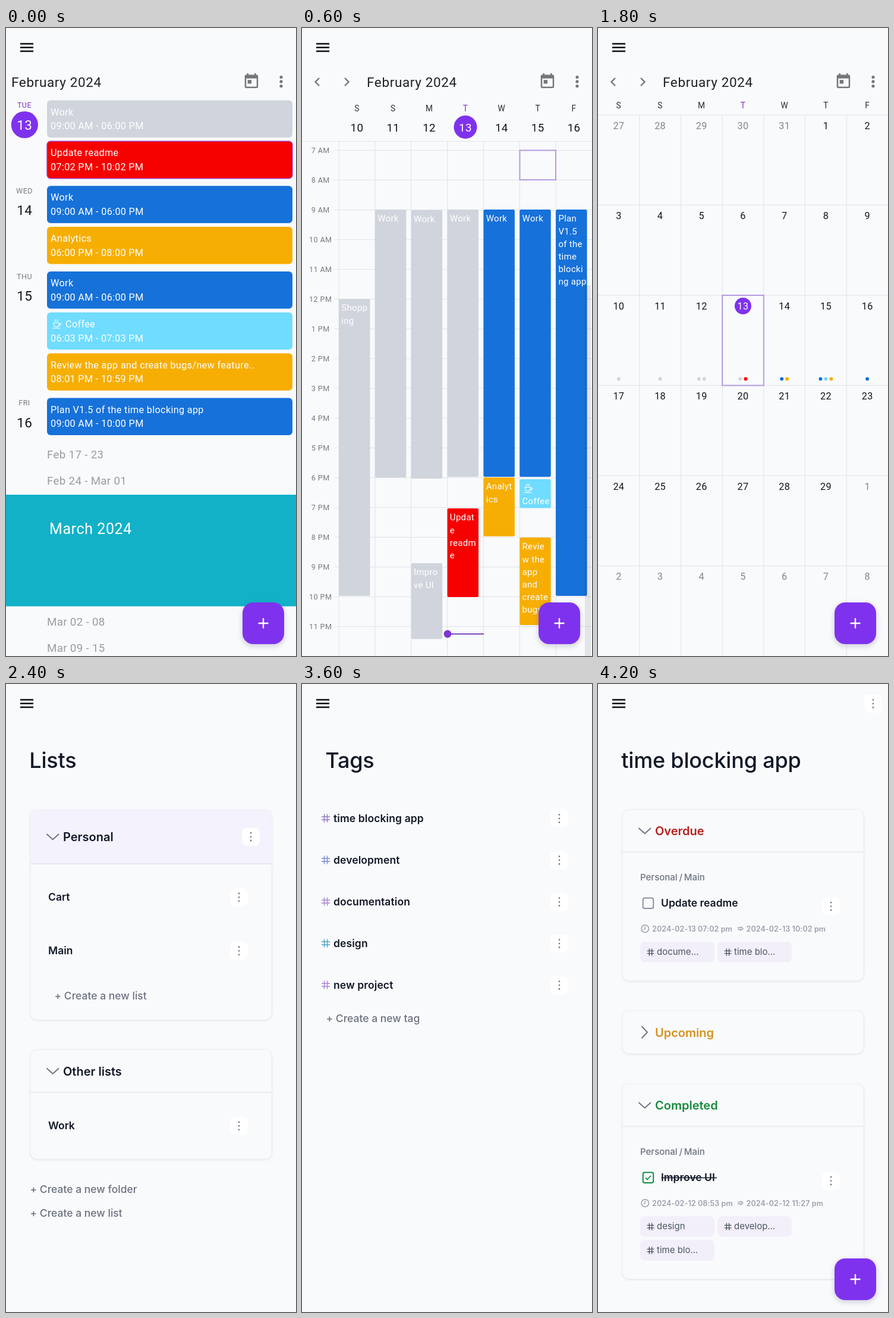
An HTML page for the animation above (4.8 s loop, 488x1055 px).

```html
<!DOCTYPE html>
<html lang="en">
<head>
<meta charset="utf-8">
<title>Time blocking</title>
<style>
html, body { margin: 0; width: 100%; height: 100%; overflow: hidden; background: #f9fafc; }
svg { position: absolute; left: 0; top: 0; width: 488px; height: 1055px; display: block; }
text { white-space: pre; }
.scene { visibility: hidden; animation: show 4.8s step-end infinite; animation-delay: calc(var(--i) * .6s - 4.8s); }
.cal { font-family: Roboto, sans-serif; letter-spacing: .31px; }
.app { font-family: Inter, sans-serif; font-optical-sizing: none; }
.fab { filter: drop-shadow(0 3px 5px rgba(80, 80, 115, .28)); }
.card { filter: drop-shadow(0 1.5px 1.5px rgba(60, 65, 90, .13)); }
@keyframes show { 0% { visibility: visible; } 12.5%, 100% { visibility: hidden; } }
</style>
</head>
<body>
<svg id="stage" viewBox="0 0 488 1055"></svg>
<script>
const BG = '#f9fafc', PURPLE = '#7f32ee', INK = '#111827', MUTED = '#6b7280', GRID = '#e2e3e7';
const GRAY = '#d0d4dc', BLUE = '#1671d9', AMBER = '#f7ae02', SKY = '#70dcff', RED = '#f60000';

// Shapes; text is placed by the middle of its capitals.
const text = (x, cy, s, size, fill, more = '') =>
  `<text x="${x}" y="${cy + size * .36}" font-size="${size}" fill="${fill}" ${more}>${s}</text>`;
const mid = (x, cy, s, size, fill, more = '') => text(x, cy, s, size, fill, 'text-anchor="middle" ' + more);
const bold = (x, cy, s, size, fill, weight = 600) => text(x, cy, s, size, fill, `font-weight="${weight}"`);
const rect = (x, y, w, h, r, fill, more = '') =>
  `<rect x="${x}" y="${y}" width="${w}" height="${h}" rx="${r}" fill="${fill}" ${more}/>`;
const dot = (x, y, r, fill) => `<circle cx="${x}" cy="${y}" r="${r}" fill="${fill}"/>`;
const line = (d, color, w = 1, more = '') =>
  `<path d="${d}" fill="none" stroke="${color}" stroke-width="${w}" ${more}/>`;
const range = n => [...Array(n).keys()];
const scenes = [];
const scene = (kind, ...parts) => scenes.push(
  `<g class="scene ${kind}" style="--i:${scenes.length}">${rect(0, 0, 488, 1055, 0, BG)}${parts.flat(3).join('')}</g>`);

const menu = line('M24 26.5h22M24 32.7h22M24 39h22', '#0b0b10', 2.5);
const fab = `<g class="fab">${rect(398, 965, 70, 70, 18, PURPLE)}</g>` +
  line('M424.5 1000h17M433 991.5v17', '#fff', 2.4);

// Calendar
const calendarHead = x => [
  menu,
  text(x, 91, 'February 2024', 22.5, '#202126', 'letter-spacing=".62"'),
  x > 50 ? line('M29 84l-6.5 6.5 6.5 6.5M72 84l6.5 6.5-6.5 6.5', '#74767b', 2.4) : '',
  `<path transform="translate(398 74.7) scale(1.25)" fill="#74767b" fill-rule="evenodd" d="M19 3h-1V1h-2v2H8V1H6v2H5c-1.1 0-2 .9-2 2v14c0 1.1.9 2 2 2h14c1.1 0 2-.9 2-2V5c0-1.100-.9-2-2-2zM19 19H5V8h14zM7 10h5v5H7z"/>`,
  [82.5, 90, 97.5].map(y => dot(463, y, 2.6, '#74767b'))
];
const cup = (x, y) => `<g transform="translate(${x} ${y})">` +
  line('M3 6.500h9.500c0 4-1.500 7-4.700 7s-4.800-3-4.800-7zM12.500 7.500c4-.8 3.500 3.500-.8 3.500M1 15.500h13.500M6 5c-1.500-2 1.500-2.500 0-4.500M9.500 5c-1.500-2 1.500-2.500 0-4.500', '#fff', 1.2) + '</g>';

const agenda = [
  ['TUE', 13, ['Work', '09:00 AM - 06:00 PM', GRAY], ['Update readme', '07:02 PM - 10:02 PM', RED]],
  ['WED', 14, ['Work', '09:00 AM - 06:00 PM', BLUE], ['Analytics', '06:00 PM - 08:00 PM', AMBER]],
  ['THU', 15, ['Work', '09:00 AM - 06:00 PM', BLUE], ['Coffee', '06:03 PM - 07:03 PM', SKY],
    ['Review the app and create bugs/new feature..', '08:01 PM - 10:59 PM', AMBER]],
  ['FRI', 16, ['Plan V1.5 of the time blocking app', '09:00 AM - 10:00 PM', BLUE]]
];
function agendaRows() {
  let y = 121.5;
  return agenda.map(([name, day, ...events]) => {
    const today = day === 13;
    const out = [
      mid(31, y + 8, name, 12.5, today ? '#7a35c4' : '#7b7c81', 'letter-spacing=".5"'),
      today ? dot(31.3, y + 41, 22.6, PURPLE) : '',
      mid(31.3, y + 41, day, 22.5, today ? '#fff' : '#15161a')
    ];
    for (const [title, time, color] of events) {
      const coffee = color === SKY;
      out.push(
        rect(69, y, 413, 62.5, 6, color, color === RED ? 'stroke="#a03cc0" stroke-width="1.3"' : ''),
        coffee ? cup(77, y + 11) : '',
        text(coffee ? 100 : 75, y + 19.3, title, 16.25, '#fff'),
        text(75, y + 43, time, 16.25, '#fff'));
      y += 68.75;
    }
    y += 6.25;
    return out;
  });
}
const weeks = [['Feb 17 - 23', 716], ['Feb 24 - Mar 01', 760], ['Mar 02 - 08', 997], ['Mar 09 - 15', 1041]];
scene('cal', calendarHead(9), agendaRows(),
  weeks.map(([s, y]) => text(69, y, s, 18.75, '#9b9ca0')),
  rect(0, 784, 488, 187.5, 0, '#12b1c8'),
  text(73, 841, 'March 2024', 25, '#fff', 'letter-spacing=".6"'), fab);

const COL = 60.85, colX = i => 62 + i * COL;
const hours = range(17).map(i => {
  const y = 205.5 + 50 * i;
  const s = `${(i + 6) % 12 + 1} ${i < 5 ? 'AM' : 'PM'}`;
  return mid(31.2, y, s, 12.5, '#77787d', 'letter-spacing=".45"') + line(`M55 ${y}H488`, GRID);
});
const scrollbar = rect(476, 432, 10, 640, 3, '#000', 'opacity=".09"');
const nowLine = (x, end) => line(`M${x} 1018H${end}`, '#8046b8', 1.8) + dot(x, 1018, 6.4, '#7b36cf');
const block = (x, w, y, end, color, lines, more) => [
  rect(x, y, w, end - y, 2.5, color, more),
  lines.map((s, k) => s === '*' ? cup(x + 6, y + 7) : text(x + 4.3, y + 15 + 21.2 * k, s, 15, '#fff'))
];
const weekEvents = [
  [0, 455, 954, GRAY, 'Shopp|ing'],
  [1, 305, 755, GRAY, 'Work'],
  [2, 306, 757, GRAY, 'Work'],
  [2, 899, 1026.5, GRAY, 'Impro|ve UI'],
  [3, 305, 754, GRAY, 'Work'],
  [3, 807, 956, RED, 'Updat|e|readm|e'],
  [4, 305, 754, BLUE, 'Work'],
  [4, 755, 854, AMBER, 'Analyt|ics'],
  [5, 305, 754, BLUE, 'Work'],
  [5, 758, 806.5, SKY, '*|Coffee'],
  [5, 856, 1003, AMBER, 'Revie|w the|app|and|create|bugs'],
  [6, 305, 954, BLUE, 'Plan|V1.5|of the|time|blocki|ng app']
];
scene('cal', calendarHead(109), hours,
  line('M0 190.500H488', GRID), range(7).map(i => line(`M${colX(i)} 190V1055`, GRID)),
  [...'SSMTWTF'].map((s, i) => {
    const x = colX(i) + COL / 2, today = i === 3;
    return mid(x, 135, s, 13.75, today ? '#7a35c4' : '#2c2d31') +
      (today ? dot(x, 166.500, 19.5, PURPLE) : '') + mid(x, 167, 10 + i, 18.75, today ? '#fff' : '#15161a');
  }),
  weekEvents.map(([c, y, end, color, s]) => block(colX(c), 52.5, y, end, color, s.split('|'))),
  rect(366.5, 205.5, 60.5, 49.5, 0, 'none', 'stroke="#b49be0" stroke-width="2"'),
  nowLine(245, 306), scrollbar, fab);

scene('cal', calendarHead(109), hours,
  line('M0 190H488M62 115V1055', GRID),
  mid(31, 135, 'TUE', 13.75, '#7a35c4', 'letter-spacing=".4"'),
  dot(31.2, 166.5, 19.5, PURPLE), mid(31.2, 167, 13, 18.75, '#fff'),
  block(62.5, 417, 305, 754.5, GRAY, ['Work'], 'stroke="#ae97da" stroke-width="2"'),
  block(62.5, 417, 807, 955.5, RED, ['Update readme']),
  nowLine(62.3, 488), scrollbar, fab);

// Month
const CW = 488 / 7, CH = 151.5, TOP = 146;
const marks = { 14: [GRAY], 15: [GRAY], 16: [GRAY, GRAY], 17: [GRAY, RED], 18: [BLUE, AMBER], 19: [BLUE, SKY, AMBER], 20: [BLUE] };
scene('cal', calendarHead(109),
  [...'SSMTWTF'].map((s, i) => mid(CW * (i + .5), 130, s, 13.75, i === 3 ? '#7a35c4' : '#2c2d31')),
  range(6).map(r => line(`M0 ${TOP + CH * r}H488`, GRID)),
  range(6).map(c => line(`M${CW * (c + 1)} ${TOP}V1055`, GRID)),
  range(42).map(k => {
    const x = CW * (k % 7 + .5), y = TOP + CH * Math.floor(k / 7), today = k === 17;
    const day = new Date(2024, 0, 27 + k).getDate(), dim = k < 5 || k > 33;
    const list = marks[k] || [];
    return [
      today ? rect(x - CW / 2, y, CW, CH, 0, 'none', 'stroke="#b49be0" stroke-width="2"') + dot(x, y + 18, 14, PURPLE) : '',
      mid(x, y + 18, day, 16.25, today ? '#fff' : dim ? '#85868b' : '#15161a'),
      list.map((c, n) => dot(x + (n - (list.length - 1) / 2) * 9, y + CH - 11, 3, c))
    ];
  }), fab);

// Lists and tasks
const title = s => text(39.3, 128, s, 36, INK, 'font-weight="500" letter-spacing="-.2"');
const kebab = (x, y) => rect(x - 15, y - 15, 30, 30, 8, '#fff') +
  [-6.4, 0, 6.4].map(d => dot(x, y + d, 1.3, MUTED)).join('');
const chevron = (y, open = true) =>
  line(open ? `M69 ${y - 4.5}l9.700 8.700 9.700-8.700` : `M74 ${y - 10}l9 9.500-9 9.500`, MUTED, 1.9, 'stroke-linecap="round"');
const card = (y, end, split) =>
  `<g class="card">${rect(41, y, 406, end - y, 11, BG, 'stroke="#eff0f4"')}</g>` +
  (split ? line(`M41 ${split}H447`, '#e6e8ed', 1.6) : '');
const heading = (y, s, color = INK, open = true) => chevron(y, open) + bold(96, y, s, 20, color);
const action = (x, y, s) => bold(x, y, '+ Create a new ' + s, 17.5, MUTED, 500);
const hash = (x, y, color, k = 1) =>
  line(`M${x - 7 * k} ${y - 2.5 * k}h${14 * k}m0 ${5 * k}h${-14 * k}M${x - 2.5 * k} ${y - 7 * k}v${14 * k}M${x + 2.5 * k} ${y - 7 * k}v${14 * k}`, color, 1.4);
const listRow = (y, s) => bold(71, y, s, 17.5, INK) + kebab(392, y + .3);

scene('app', menu, title('Lists'),
  card(211, 564), `<path d="M41 302V216q0-5 5-5H442q5 0 5 5V302z" fill="#f3f2fd"/>`,
  line('M41 302H447', '#e6e6f0', 1.8),
  heading(257, 'Personal'), kebab(412, 256.5),
  listRow(358, 'Cart'), listRow(448, 'Main'), action(81.500, 524, 'list'),
  card(614, 798, 686), heading(650.5, 'Other lists'), listRow(742, 'Work'),
  action(40.5, 849, 'folder'), action(40.5, 889, 'list'));

const chip = (x, y, s) => rect(x, y, 125, 34.5, 8, '#f2effa') +
  hash(x + 17.5, y + 17.5, '#4b5563', .85) + bold(x + 28, y + 17, s, 15, '#4b5563', 400);
const stamp = (x, y, s) => text(x, y, s, 12.5, '#9ba1ad', 'font-weight="600" letter-spacing=".1"');
const task = (y, name, from, to, done) => {
  const c = done ? '#148a43' : '#8b90a0';
  return [
    text(71, y, 'Personal / Main', 15, MUTED, 'font-weight="500" word-spacing="-1.2"'),
    rect(75.7, y + 34.5, 17.5, 17.5, 3, 'none', `stroke="${c}" stroke-width="2"`),
    done ? line(`M80 ${y + 43.500}l3 3 6-6.500`, c, 1.8) : '',
    bold(106, y + 43, name, 17.5, INK),
    done ? line(`M106.500 ${y + 43.500}H200`, INK, 1.6) : '',
    kebab(392, y + 48.5),
    `<circle cx="79.300" cy="${y + 86}" r="6.200" fill="none" stroke="#9ba1ad" stroke-width="1.500"/>`,
    line(`M79.300 ${y + 82}v4.500l-3 1`, '#9ba1ad', 1.3),
    stamp(91, y + 86, from),
    line(`M235 ${y + 84.500}h6M235 ${y + 87.500}h6M240 ${y + 82.500}l4 3.500-4 3.500`, '#9ba1ad', 1.4),
    stamp(249.500, y + 86, to)
  ];
};
const board = [
  card(211, 498.5, 282), heading(247, 'Overdue', '#b3201c'),
  task(325, 'Update readme', '2024-02-13 07:02 pm', '2024-02-13 10:02 pm'),
  chip(71, 433, 'docume...'), chip(201, 433, 'time blo...'),
  card(549, 621), heading(585.5, 'Upcoming', '#d6911b', false),
  card(672, 999.5, 743), heading(708, 'Completed', '#168a3d'),
  task(786, 'Improve UI', '2024-02-12 08:53 pm', '2024-02-12 11:27 pm', true),
  chip(71, 894, 'design'), chip(201, 894, 'develop...'), chip(71, 934, 'time blo...'), fab
];
scene('app', menu, title('Tasks'), board);

const tags = [['time blocking app', '#8f7ac9'], ['development', '#7a88d6'], ['documentation', '#a982d6'],
  ['design', '#4fa3c0'], ['new project', '#a982d6']];
scene('app', menu, title('Tags'),
  tags.map(([s, c], i) => {
    const y = 225.5 + 70 * i;
    return hash(40, y, c) + text(53, y, s, 17.5, INK, 'font-weight="600" letter-spacing=".1"') + kebab(433, y + .5);
  }),
  action(40.5, 561.5, 'tag'));

scene('app', menu, kebab(463, 33), title('time blocking app'), board);

document.getElementById('stage').innerHTML = scenes.join('');
</script>
</body>
</html>
```
